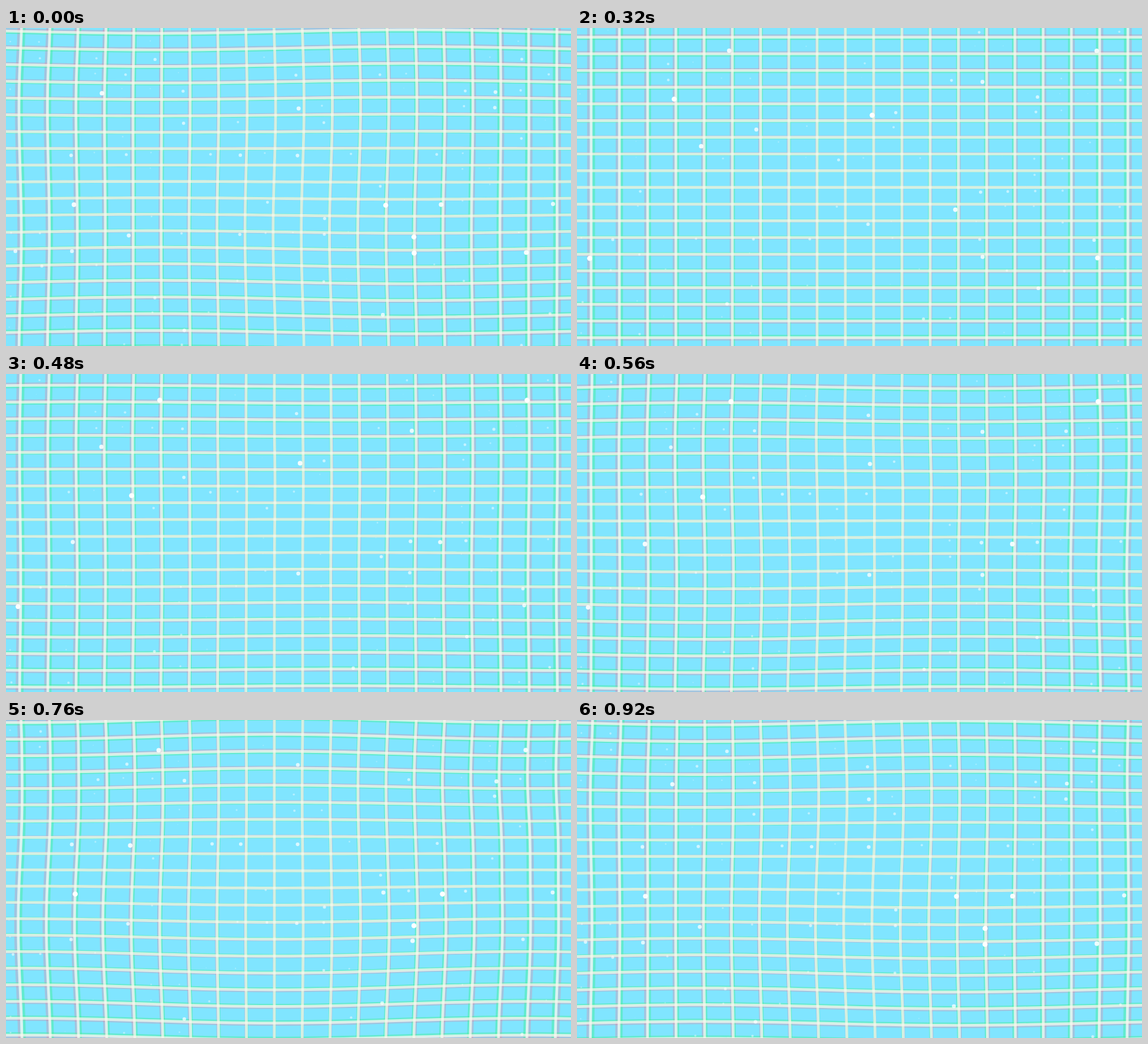
Animation, 960 px wide and 540 px high, one loop 960 ms. Source, as an HTML page:

```html
<!DOCTYPE html>
<html lang="en">
<head>
<meta charset="utf-8">
<title>Rippling grid</title>
<style>
  html, body { margin: 0; width: 100%; height: 100%; overflow: hidden; background: #80e5ff; }
  svg { display: block; width: 960px; height: 540px; }
  .grid path { fill: none; stroke-width: 4.7; }
  .rose path { stroke: rgba(255, 100, 130, .26); }
  .mint path { stroke: rgba(60, 240, 150, .45); }
  .cream path { stroke: rgba(250, 248, 239, .73); }
</style>
</head>
<body>
<svg viewBox="0 0 960 540">
  <rect width="960" height="540" fill="#80e5ff"/>
  <g class="grid rose" transform="translate(480 270) scale(1.0095) translate(-480 -270)"><path class="v"/><path class="h"/></g>
  <g class="grid mint" transform="translate(480 270) scale(.9905) translate(-480 -270)"><path class="v"/><path class="h"/></g>
  <g class="grid cream"><path class="v"/><path class="h"/></g>
  <g id="dots" fill="#fff"></g>
</svg>
<script>
const LOOP = 960, STEP = 40;
const COL = 48, ROW = 28.35, DOT_ROW = 27, COLS = 20, DOT_ROWS = 21;
const CREST = 780; // time of the strongest ripple
const TAU = 2 * Math.PI;

const wave = (d, length) => Math.cos(TAU * d / length);
const bell = (d, s) => Math.exp(-d * d / (2 * s * s));

// Returns a function that bends a point: waves run to the right, swell and calm once a loop.
function ripple(t) {
  let d = t - CREST;
  d -= LOOP * Math.round(d / LOOP);
  const power = Math.cos(Math.PI * d / LOOP) ** 2;
  const side = 836 + 2.3 * d, lift = 478 + 1.15 * d, swell = 920 + 1.6 * d;
  return (x, y) => {
    const dx = 3.6 * wave(x - side, 1360) * wave(y - 350, 440)
      + 4 * bell(x - swell, 140) * bell(y - 190, 55)
      + 3 * bell(x - 90, 120) * bell(y, 50);
    const dy = 4.3 * wave(x - lift, 860) * Math.sin(Math.PI * (y - 225) / 480);
    return (x + power * dx).toFixed(2) + ' ' + (y + power * dy).toFixed(2);
  };
}

function drawGrid(t) {
  const bend = ripple(t);
  let v = '', h = '';
  for (let x = COL / 2; x < 960; x += COL) {
    const pts = [];
    for (let y = -20; y <= 560; y += 20) pts.push(bend(x, y));
    v += 'M' + pts.join('L');
  }
  for (let y = 6.1 + ROW * (t / LOOP - 1); y < 560; y += ROW) {
    const pts = [];
    for (let x = -24; x <= 984; x += 24) pts.push(bend(x, y));
    h += 'M' + pts.join('L');
  }
  document.querySelectorAll('.v').forEach(p => p.setAttribute('d', v));
  document.querySelectorAll('.h').forEach(p => p.setAttribute('d', h));
}

let seed = 7;
const rand = () => (seed = (seed * 16807) % 2147483647) / 2147483647;

// Size is a share of the cell; larger dots live longer.
const dot = (col, row, peak, size) => ({ col, row, peak, size, life: 350 + 650 * size });

// The largest dots: column, row, time of full size
const dots = [
  [10, 4, 290], [5, 0, 560], [18, 0, 540], [3, 3, 220], [4, 6, 540], [2, 9, 760],
  [15, 9, 750], [13, 10, 90], [14, 11, 860], [0, 13, 330], [18, 13, 170], [14, 13, 30]
].map(([col, row, peak]) => dot(col, row, peak, .45));

for (let n = 0; n < COLS * DOT_ROWS; n++) {
  const show = rand() < .3, peak = rand() * LOOP, size = .07 + .3 * rand();
  if (show) dots.push(dot(n % COLS, Math.floor(n / COLS) - 1, peak, size));
}

function drawDots(t) {
  const cells = new Map();
  for (const { col, row, peak, size, life } of dots) {
    for (let lap = -1; lap <= 1; lap++) {
      const d = (t + lap * LOOP - peak) / life;
      const f = size * (1 - d * d);
      const key = col + ',' + (row + lap);
      if (f > .02 && f > (cells.get(key)?.f || 0)) cells.set(key, { col, row: row + lap, f });
    }
  }
  let out = '';
  for (const { col, row, f } of cells.values()) {
    const x = COL * (col + f), y = 19 + DOT_ROW * (row + f + t / LOOP);
    out += `<circle cx="${x.toFixed(2)}" cy="${y.toFixed(2)}" r="${(f * 9.7).toFixed(2)}" opacity="${Math.min(1, f * 2.2).toFixed(2)}"/>`;
  }
  document.getElementById('dots').innerHTML = out;
}

const start = performance.now();
let last = -1;
function tick() {
  const t = Math.floor((performance.now() - start) / STEP) * STEP % LOOP;
  if (t !== last) {
    last = t;
    drawGrid(t);
    drawDots(t);
  }
  requestAnimationFrame(tick);
}
tick();
</script>
</body>
</html>
```
